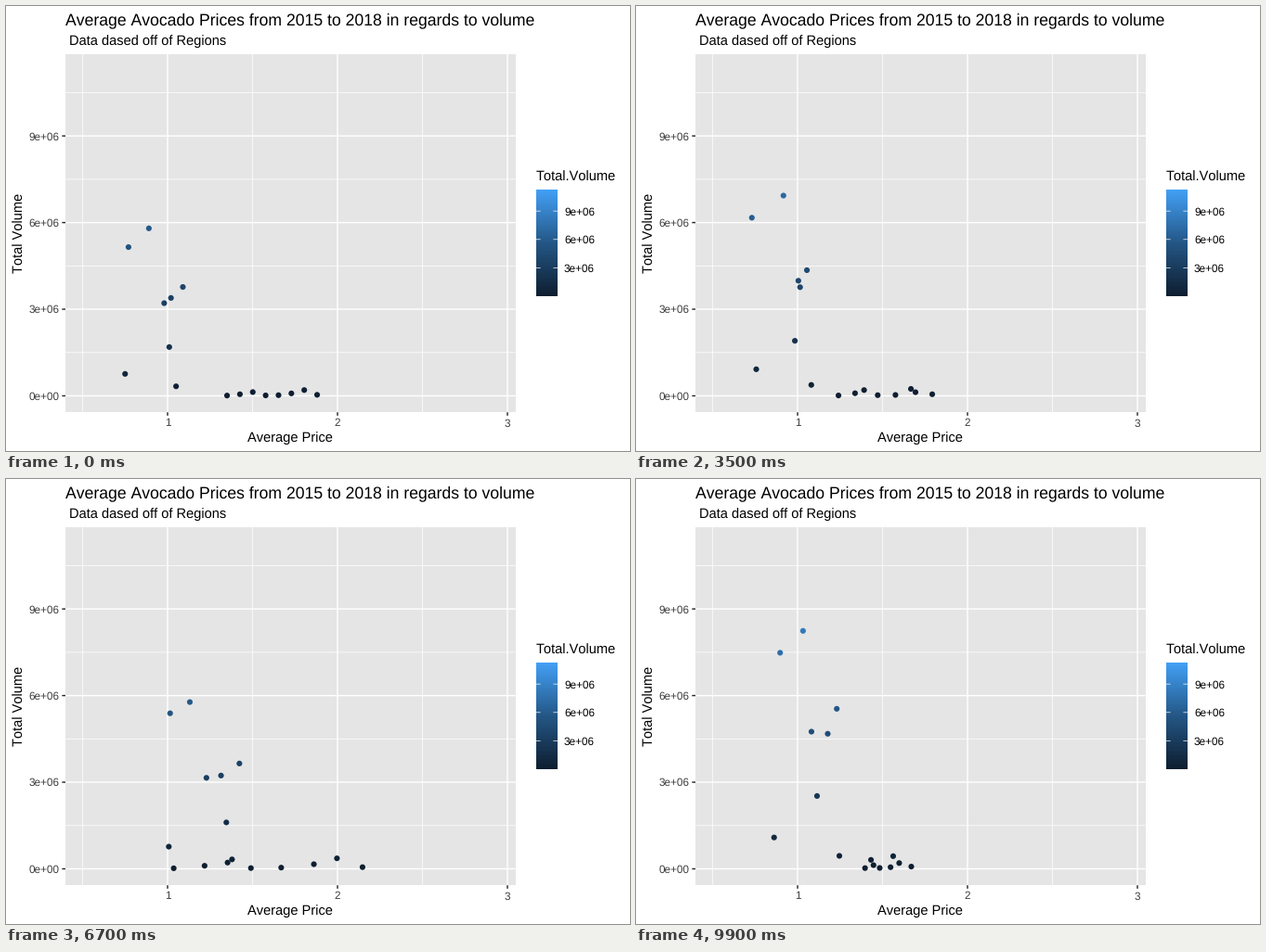
Recreate the animation shown at these times as a matplotlib script. Size 672 by 480 pixels, loop 10 s.

```python
import numpy as np
import matplotlib.pyplot as plt
from matplotlib.animation import FuncAnimation
from matplotlib.colors import LinearSegmentedColormap
from matplotlib.patches import Rectangle

plt.rcParams.update({
    "font.family": "Liberation Sans",
    "text.hinting": "none",
    "text.hinting_factor": 8,
    "text.kerning_factor": 6,
})

W, H, DPI = 672, 480, 96
FRAMES, STEP = 100, 100
LEFT, RIGHT, TOP, BOTTOM = 64, 548.7, 52, 438.2
MAX_VOLUME = 11.27
BLUES = LinearSegmentedColormap.from_list(
    "volume", np.array([(14, 30, 48), (36, 87, 134), (67, 160, 246)]) / 255)

time = np.arange(FRAMES)
rng = np.random.default_rng(8)


def curve(*points):
    """Straight segments through (moment, value) points, as a column."""
    return np.interp(time, *zip(*points))[:, None]


def jitter(sd):
    """Weekly multipliers around 1, starting at exactly 1."""
    steps = rng.normal(0, sd, (FRAMES, 8)).clip(-2 * sd, 2 * sd)
    steps[0] = 0
    return np.exp(steps)


# Conventional fruit: each region follows the market from its first week.
start_price = np.array([.89, .77, 1.09, 1.02, .98, 1.01, .75, 1.05])
start_volume = np.array([5.80, 5.15, 3.77, 3.39, 3.21, 1.69, .76, .33])
price_index = curve((0, 1), (15, 1.08), (35, .99), (55, 1.42),
                    (67, 1.30), (80, 1.39), (99, 1.16))
volume_index = curve((0, 1), (15, 1.22), (35, 1.18), (55, .81),
                     (67, 1), (80, 1.06), (99, 1.42))

# Holiday weeks sell more at lower prices: moment -> strength.
holidays = {3: .34, 10: .25, 33: .08, 41: .34, 64: .71, 72: .34, 77: .30}
surge = sum(s * np.exp(-((time - t) / .8) ** 2) for t, s in holidays.items())
surge = surge[:, None]

bulk_price = start_price * price_index * np.exp(-.6 * surge) * jitter(.025)
bulk_volume = start_volume * volume_index * np.exp(surge) * jitter(.025)

# Organic fruit: regions spread between the cheapest and the dearest.
low = curve((0, 1.35), (15, 1.34), (35, 1.24), (55, 1.36),
            (67, 1.04), (80, 1.52), (99, 1.42))
high = curve((0, 1.88), (15, 2.09), (35, 1.80), (50, 2.80), (55, 2.27),
             (60, 2.55), (67, 2.18), (80, 2.24), (84, 2.53), (88, 1.95),
             (99, 1.63))
organic_price = (low + (high - low) * np.linspace(0, 1, 8)) * jitter(.02)
organic_volume = (rng.permutation(np.geomspace(.01, .2, 8))
                  * curve((0, 1), (99, 2.2)) * jitter(.1))

price = np.hstack([bulk_price, organic_price])
volume = np.hstack([bulk_volume, organic_volume]).clip(0, MAX_VOLUME)


def px(p):
    return 174 + 183 * (p - 1)


def py(v):
    return 420.5 - 31.15 * v


fig = plt.figure(figsize=(W / DPI, H / DPI), dpi=DPI, facecolor="white")
ax = fig.add_axes([0, 0, 1, 1])
ax.set_axis_off()


def line(xs, ys, width, color="white", z=2):
    ax.plot(xs, ys, color=color, lw=width, solid_capstyle="butt",
            snap=False, zorder=z)


def label(x, y, text, size, color="black", **kw):
    ax.text(x, y, text, size=size, color=color, va="baseline", **kw)


# Panel and grid
ax.add_patch(Rectangle((LEFT, TOP), RIGHT - LEFT, BOTTOM - TOP,
                       color="#e5e5e5", lw=0, zorder=1))
for p in (.5, 1.5, 2.5):
    line([px(p)] * 2, [TOP, BOTTOM], .533)
for v in (1.5, 4.5, 7.5, 10.5):
    line([LEFT, RIGHT], [py(v)] * 2, .533)
for p in (1, 2, 3):
    line([px(p)] * 2, [TOP, BOTTOM], 1.067)
    line([px(p)] * 2, [BOTTOM, BOTTOM + 3.67], 1.067, "#262626")
    label(px(p), 453.4, str(p), 8.8, "#3f3f3f", ha="center")
for v in (0, 3, 6, 9):
    line([LEFT, RIGHT], [py(v)] * 2, 1.067)
    line([LEFT - 3.67, LEFT], [py(v)] * 2, 1.067, "#262626")
    label(57.4, py(v) + 4.3, f"{v * 1e6:.0e}", 8.8, "#3f3f3f", ha="right")

# Titles
label(LEFT, 20, "Average Avocado Prices from 2015 to 2018 in regards to volume",
      13.2)
label(67.6, 42, "Data dased off of Regions", 11)
label((LEFT + RIGHT) / 2, 469.7, "Average Price", 11, ha="center")
label(18.6, (TOP + BOTTOM) / 2, "Total Volume", 11, rotation=90,
      rotation_mode="anchor", ha="center")

# Colour bar
X0, X1, Y0, Y1 = 571, 594, 198, 313
label(570.6, 189, "Total.Volume", 11)
ax.imshow(np.linspace(1, 0, 256)[:, None], cmap=BLUES, aspect="auto",
          extent=(X0, X1, Y1, Y0), interpolation="bilinear", zorder=2)
for v in (3, 6, 9):
    y = Y1 - (Y1 - Y0) * v / MAX_VOLUME
    line([X0, X0 + 4.6], [y, y], .53, z=3)
    line([X1 - 4.6, X1], [y, y], .53, z=3)
    label(601, y + 4.3, f"{v * 1e6:.0e}", 8.8)

ax.set_xlim(0, W)
ax.set_ylim(H, 0)

dots = ax.scatter(px(price[0]), py(volume[0]), c=volume[0], s=21.2,
                  cmap=BLUES, vmin=0, vmax=MAX_VOLUME, linewidths=0, zorder=4)


def update(i):
    dots.set_offsets(np.column_stack([px(price[i]), py(volume[i])]))
    dots.set_array(volume[i])
    return dots,


anim = FuncAnimation(fig, update, frames=FRAMES, interval=STEP, repeat=True,
                     repeat_delay=0)
plt.show()
```
